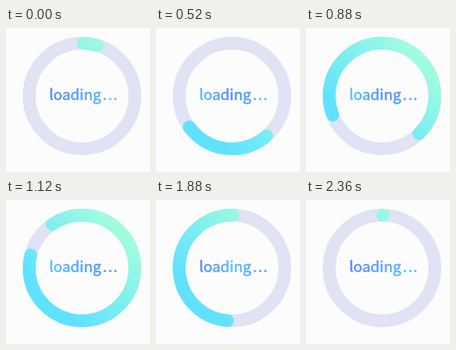
These frames come from a looping animation (180 px wide and 180 px high, 2.4 s). An HTML page:

```html
<!DOCTYPE html>
<html lang="en">
<head>
<meta charset="utf-8">
<title>Loading</title>
<style>
  html, body { margin: 0; height: 100%; overflow: hidden; background: #fcfcfc; }
  svg { display: block; width: 100%; height: 100%; }
  circle { fill: none; stroke-width: 16; }
  text { font: 18.5px "Noto Sans CJK SC", "Noto Sans CJK JP", "Noto Sans CJK", "Noto Sans", sans-serif; stroke-width: .5; }
  tspan { letter-spacing: 1.5px; }
</style>
</head>
<body>
<svg viewBox="0 0 180 180">
  <defs>
    <linearGradient id="ring" gradientUnits="userSpaceOnUse" x1="60" y1="122" x2="155" y2="30">
      <stop stop-color="#60e2ff"/>
      <stop offset="1" stop-color="#a8ffdb"/>
    </linearGradient>
    <linearGradient id="ink" gradientUnits="userSpaceOnUse" x1="55" y1="0" x2="140" y2="0">
      <stop offset="0"/><stop offset=".5"/><stop offset="1"/>
    </linearGradient>
  </defs>
  <circle cx="95" cy="85" r="66" stroke="#dfe3f3"/>
  <circle id="arc" cx="95" cy="85" r="66" pathLength="360" stroke="url(#ring)" stroke-linecap="round"/>
  <text x="54" y="90" fill="url(#ink)" stroke="url(#ink)">loading<tspan x="121">...</tspan></text>
</svg>
<script>
const LOOP = 2400, STEP = 40, CLOSED = 1400;
const arc = document.getElementById('arc');
const stops = document.querySelectorAll('#ink stop');

const clamp = v => Math.min(1, Math.max(0, v));
const mix = (a, b, u) => a + (b - a) * u;
const easeInOut = (u, out) => 1 - (1 - clamp(u) ** 1.8) ** out;

// Both ends go round twice; angles are clockwise from the top.
const tailAngle = t => 1.5 + 360 * clamp(t / 1230) ** 1.12
  + 360 * easeInOut((t - CLOSED) / (LOOP - CLOSED), 2.3);
const headAngle = t => mix(17, 721.5, easeInOut(t / CLOSED, 2));

// 0 = blue, 1 = cyan
const inkColor = v => `rgb(${mix(86, 88, v)},${mix(136, 196, v)},${mix(252, 250, v)})`;

function draw(now) {
  const t = Math.floor(now % LOOP / STEP) * STEP;
  const tail = tailAngle(t), length = Math.min(360, headAngle(t) - tail);
  arc.setAttribute('stroke-dasharray', `${length} ${360 - length}`);
  arc.setAttribute('stroke-dashoffset', 90 - tail);

  const phase = 2 * Math.PI * t / LOOP, c = Math.cos(phase), s = Math.sin(phase);
  [1 - c + s, 1 - s, 1 + c + s].forEach((v, i) =>
    stops[i].setAttribute('stop-color', inkColor(clamp(v / 2))));
  requestAnimationFrame(draw);
}
draw(performance.now());
</script>
</body>
</html>
```
